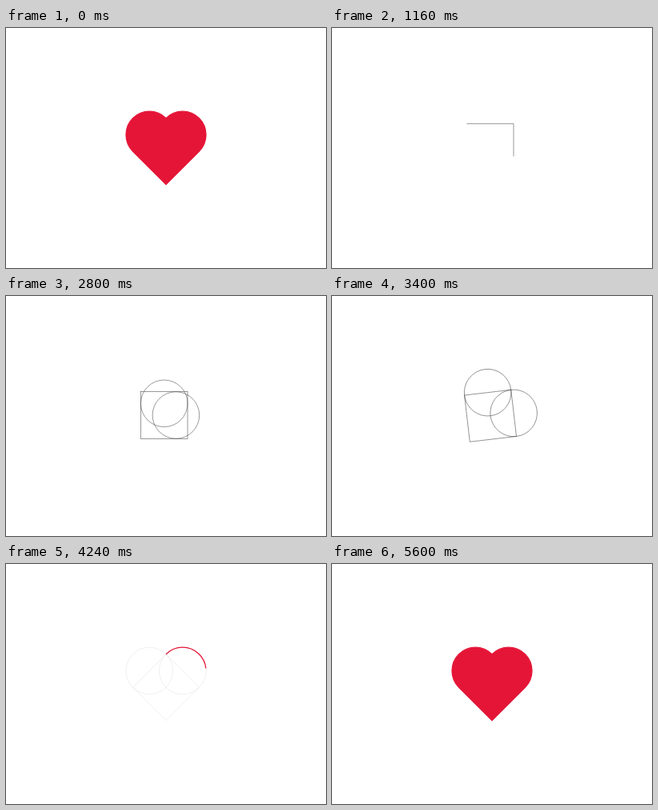
An HTML page for the animation above (6 s loop, 400 px wide and 300 px high).

```html
<!DOCTYPE html>
<html lang="en">
<head>
<meta charset="utf-8">
<title>Heart construction</title>
<style>
  html, body { margin: 0; width: 100%; height: 100%; overflow: hidden; background: #fff; }
  svg { display: block; width: 100%; height: 100%; }
  #guides { fill: none; stroke: #333; stroke-width: .5; }
  #heart { fill: #e51537; stroke: #e51537; stroke-width: 1.25; }
</style>
</head>
<body>
<svg viewBox="0 0 400 300">
  <g id="guides">
    <rect id="square" x="-29.3" y="-29.3" width="58.6" height="58.6" pathLength="1"/>
    <circle id="upper" r="29.3" pathLength="1"/>
    <circle id="right" r="29.3"/>
  </g>
  <path id="heart" pathLength=".95" transform="translate(200 154.2)"
    d="M0 -41.44A29.3 29.3 0 0 1 41.44 0L0 41.44L-41.44 0A29.3 29.3 0 0 1 0 -41.44Z"/>
</svg>
<script>
const LOOP = 6000, STEP = 800, RADIUS = 29.3;
const [guides, square, upper, right, heart] =
  ['guides', 'square', 'upper', 'right', 'heart'].map(id => document.getElementById(id));

// Eased progress of a stage that begins at the given step
const stage = (time, step, length = STEP) => {
  const u = Math.min(1, Math.max(0, (time - step * STEP) / length));
  return (1 - Math.cos(Math.PI * u)) / 2;
};
const drawLine = (shape, p) => {
  shape.setAttribute('stroke-dasharray', p < 1 ? `${p} 2` : 'none');
  shape.setAttribute('visibility', p > 0 ? 'visible' : 'hidden');
};

function render(time) {
  const shift = RADIUS * stage(time, 3);
  const turn = stage(time, 4);
  drawLine(square, stage(time, 1));
  drawLine(upper, stage(time, 2));
  upper.setAttribute('cy', -shift);
  right.setAttribute('cx', shift);
  right.setAttribute('visibility', shift > 0 ? 'visible' : 'hidden');
  guides.setAttribute('transform',
    `translate(${197.7 + 2.3 * turn} ${149 + 5.2 * turn}) rotate(${-45 * turn})`);
  guides.setAttribute('opacity', 1 - stage(time, 5, STEP * .4));

  const fading = time < STEP;
  drawLine(heart, fading ? 1 : stage(time, 5));
  heart.setAttribute('opacity', fading ? 1 - stage(time, 0) : 1);
  heart.setAttribute('fill-opacity', fading ? 1 : stage(time, 6));
}

const start = performance.now();
function tick() {
  render((performance.now() - start) % LOOP);
  requestAnimationFrame(tick);
}
tick();
</script>
</body>
</html>
```
